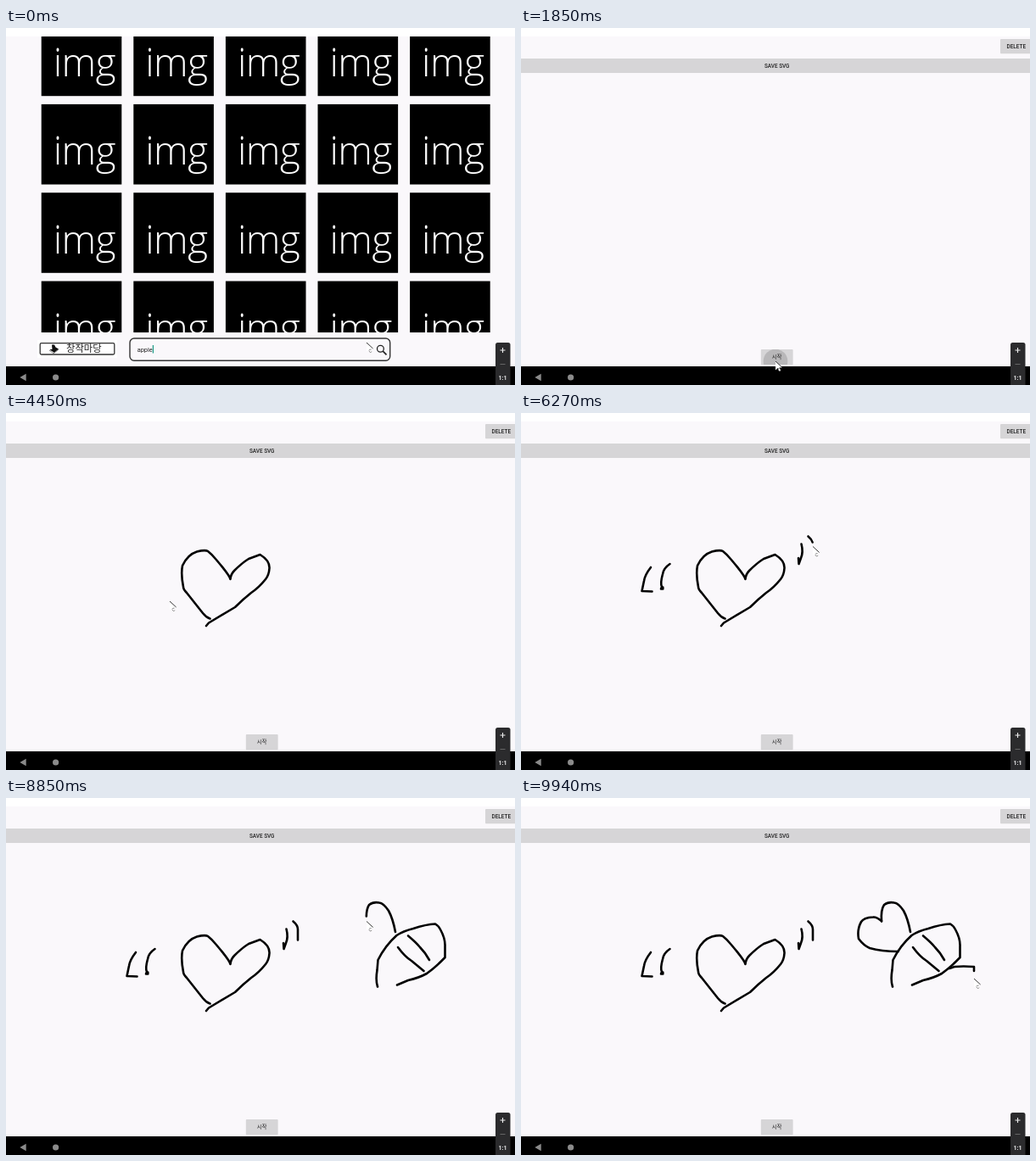
These frames come from a looping animation (600 px wide and 421 px high, 9970 ms). An HTML page:

```html
<!DOCTYPE html>
<html lang="ko">
<head>
<meta charset="utf-8">
<style>
  html, body { margin: 0; width: 100%; height: 100%; overflow: hidden; background: #000; }
  svg { display: block; width: 100vw; height: 100vh; }
  text { font-family: Roboto, "Noto Sans CJK KR", "Noto Sans CJK", sans-serif; fill: #222; }
  .thumb { font: 300 46px "Open Sans", sans-serif; fill: #fff; letter-spacing: -.6px; }
  .label { font-size: 6.4px; font-weight: 500; text-anchor: middle; }
  #ink path { fill: none; stroke: #000; stroke-width: 2.6; stroke-linecap: round; stroke-linejoin: round; }
</style>
</head>
<body>
<svg viewBox="0 0 600 421" xmlns="http://www.w3.org/2000/svg">
  <defs>
    <clipPath id="listClip"><rect y="10" width="600" height="349"/></clipPath>
    <clipPath id="startClip"><rect x="283" y="379" width="37.5" height="18" rx="1"/></clipPath>
  </defs>
  <rect width="600" height="421"/>

  <g id="gallery">
    <rect width="600" height="399" fill="#faf8fb"/>
    <rect width="600" height="10" fill="#fff"/>
    <g id="thumbs" clip-path="url(#listClip)"></g>
    <rect x="37" y="368" width="94" height="21" fill="#fff"/>
    <rect x="40.2" y="371.7" width="87.6" height="13.3" rx="1.5" fill="#fff" stroke="#333" stroke-width="1.3"/>
    <path d="M54 373.5l3 0 1.5 3 3.5 2-5 4.5-5.5-3.8 3-.4z" fill="#111"/>
    <path d="M51 380l5 3.8 6-4.6" fill="none" stroke="#777" stroke-width=".9"/>
    <text x="71" y="382.3" font-size="11.3">창작마당</text>
    <rect x="146" y="366" width="306.7" height="26.3" rx="5" fill="#faf8fb" stroke="#333" stroke-width="1.4"/>
    <text x="154.7" y="381.6" font-size="7.4">apple</text>
    <path d="M173.4 374v9.5" stroke="#1a9a86" stroke-width="1.2"/>
    <g fill="none" stroke="#222" stroke-width="1.3"><circle cx="441.4" cy="378.3" r="3.9"/><path d="M444.3 381.2l4.2 4.2" stroke-width="1.7"/></g>
  </g>
  <g id="dim"><rect width="600" height="421" opacity=".14"/><circle cx="34" cy="3" r="3.6" fill="#fff"/><circle cx="584" cy="3" r="3.6" fill="#fff"/></g>

  <g id="editor">
    <rect width="600" height="421"/>
    <rect width="600" height="399" fill="#faf8fb"/>
    <rect width="600" height="10" fill="#fff"/>
    <g id="tools">
      <rect x="565" y="13" width="36" height="17.3" rx="1" fill="#d6d5d7"/>
      <text class="label" x="583.8" y="24.2">DELETE</text>
      <rect y="36" width="600" height="17" fill="#d6d5d7"/>
      <text class="label" x="301.7" y="46.8">SAVE SVG</text>
    </g>
    <rect x="282.8" y="379" width="37.8" height="18.2" rx="1" fill="#d6d5d7"/>
    <g clip-path="url(#startClip)"><circle id="ripple" cx="300" cy="393"/></g>
    <text class="label" x="301.6" y="390">시작</text>
    <g id="ink"></g>
  </g>

  <g fill="#8b8b8b"><path d="M16.3 412l7.4-4.2v8.4z"/><circle cx="58.6" cy="412" r="3.6"/></g>
  <g id="cursor">
    <path d="M0 0V10.5L2.7 8 4.5 11.8 6.3 11 4.5 7.4H8z" fill="#fff"/>
    <path d="M0 0L7.6 7" stroke="#222" stroke-width=".9"/>
    <path d="M3 8.6l2.6-.6M2.8 9.6l1.5 2 1.9-.9" fill="none" stroke="#777" stroke-width=".8"/>
  </g>
  <g>
    <path d="M577 421v-47.500q0-2.500 2.500-2.500h12.500q2.500 0 2.500 2.500v47.500z" fill="#2b2b2d"/>
    <path d="M582.500 380h6M585.500 377v6" stroke="#eee" stroke-width="1.100"/>
    <path d="M582.500 396.500h6" stroke="#666"/>
    <text x="585.600" y="415" font-size="7" font-weight="700" text-anchor="middle" style="fill:#eee">1:1</text>
  </g>
</svg>
<script>
const LOOP = 9970, OPEN_AT = 515, TOOLS_AT = 1820, INK_LAG = 30;
const $ = id => document.getElementById(id);
const clamp = v => Math.max(0, Math.min(1, v));
const ramp = (t, a, b) => clamp((t - a) / (b - a));
const make = (parent, tag, attrs) => {
  const el = document.createElementNS('http://www.w3.org/2000/svg', tag);
  for (const key in attrs) el.setAttribute(key, attrs[key]);
  return parent.appendChild(el);
};

for (let row = 0; row < 4; row++) for (let col = 0; col < 5; col++) {
  const x = 41.7 + col * 108.6, y = -14.400 + row * 104.300;
  make($('thumbs'), 'rect', { x, y, width: 94.6, height: 94.6 });
  make($('thumbs'), 'text', { x: x + 14, y: y + 71.500, class: 'thumb' }).textContent = 'img';
}

// Pen strokes: start, end, path
const strokes = [
  [2830, 4160, 'M240.500 242.500Q236 241 232 236L213 212Q209 208 209 205Q206 190 208 180Q214 167 225 163.500Q235 161 238 163Q243 167 247 172Q264 192 264.500 196Q265 190 269 186Q278 177 286 172L299.500 167Q311 174 310.500 183Q310 191 306 196Q298 206 289 212Q279 220 270 229L239 247.500L236 251'],
  [4890, 5140, 'M153 182Q146 191 145 198L142.500 210L154.500 210.500'],
  [5250, 5510, 'M175.500 178Q168 183 167 190Q164 201 166 205L165 207.500H167.300V205.500'],
  [5840, 6040, 'M330.500 154.500Q333 164 330 171L327.500 178L327 171'],
  [6190, 6330, 'M338.500 145.500Q344 150 344 155V167.500'],
  [6570, 7320, 'M438 222.500Q435.500 215 437.500 203L438.500 191Q447 174 460.500 162Q468 157 480 154Q495 149 506 148.500Q510 151 512 155Q518 166 517.500 175V188Q507 199 496 207Q487 212 474 215L461 220.500'],
  [7450, 7650, 'M474 162.500Q483 170 488 176Q494 182 499 191'],
  [7820, 8060, 'M462 176Q470 187 478 192L492.500 204'],
  [8480, 8850, 'M459 158Q456 142 451 133Q445 124 440 123.500Q433 122 428 126Q424 132 425 145.500'],
  [8870, 9300, 'M425 145Q419 140 415 140.500Q404 141 401 146Q396 155 398 166Q404 174 411 177Q425 181 444.500 181'],
  [9490, 9860, 'M505 201L511 199Q521 198 534 199V204']
].map(([from, to, d]) => {
  const path = make($('ink'), 'path', { d });
  return { from, to, path, length: path.getTotalLength() };
});

// Cursor rests: time, x, y; the pen path takes over during strokes
const keys = [
  [0, 425, 371], [180, 440, 378], [400, 440, 378], [610, 394, 355], [1000, 472, 240],
  [1330, 166, 300], [1670, 300, 393], [1900, 300, 393], [4450, 193, 222], [4790, 169, 196],
  [8270, 459, 158], [9940, 534, 213], [LOOP, 534, 213]
];
for (const s of strokes) for (const at of [0, 1]) {
  const p = s.path.getPointAtLength(at * s.length);
  keys.push([at ? s.to : s.from, p.x, p.y]);
}
keys.sort((a, b) => a[0] - b[0]);

function cursorAt(t) {
  const s = strokes.find(s => t >= s.from && t <= s.to);
  if (s) {
    const p = s.path.getPointAtLength(s.length * ramp(t, s.from, s.to));
    return [p.x, p.y];
  }
  const i = Math.max(1, keys.findIndex(k => k[0] > t));
  const [t0, x0, y0] = keys[i - 1], [t1, x1, y1] = keys[i];
  const u = ramp(t, t0, t1), k = u * u * (3 - 2 * u);
  return [x0 + (x1 - x0) * k, y0 + (y1 - y0) * k];
}

const scaleAt = (cx, cy, sx, sy) =>
  `translate(${cx} ${cy}) scale(${sx} ${sy}) translate(${-cx} ${-cy})`;
const show = (el, on) => el.setAttribute('visibility', on ? 'visible' : 'hidden');

function render(t) {
  const open = 1 - (1 - ramp(t, OPEN_AT, OPEN_AT + 400)) ** 7;
  const grow = 1 + .05 * open;
  $('gallery').setAttribute('transform', scaleAt(305, 210, grow, grow));
  $('dim').setAttribute('opacity', ramp(t, OPEN_AT, OPEN_AT + 60));
  $('editor').setAttribute('transform', scaleAt(360, 200, 1 - .1 * (1 - open), 1 - .15 * (1 - open)));
  $('editor').setAttribute('opacity', ramp(t, OPEN_AT, OPEN_AT + 80));
  show($('tools'), t >= TOOLS_AT);

  $('ripple').setAttribute('r', t < TOOLS_AT ? 0 : 11 + 30 * ramp(t, TOOLS_AT, 2100));
  $('ripple').setAttribute('opacity', .14 * (1 - ramp(t, 1900, 2200)));

  for (const s of strokes) {
    const done = ramp(t - INK_LAG, s.from, s.to);
    show(s.path, done > 0);
    s.path.setAttribute('stroke-dasharray', `${done * s.length + (done === 1 ? 2 : 0)} ${s.length + 9}`);
  }
  $('cursor').setAttribute('transform', `translate(${cursorAt(t)})`);
}

const start = performance.now();
function tick() {
  render((performance.now() - start) % LOOP);
  requestAnimationFrame(tick);
}
tick();
</script>
</body>
</html>
```
